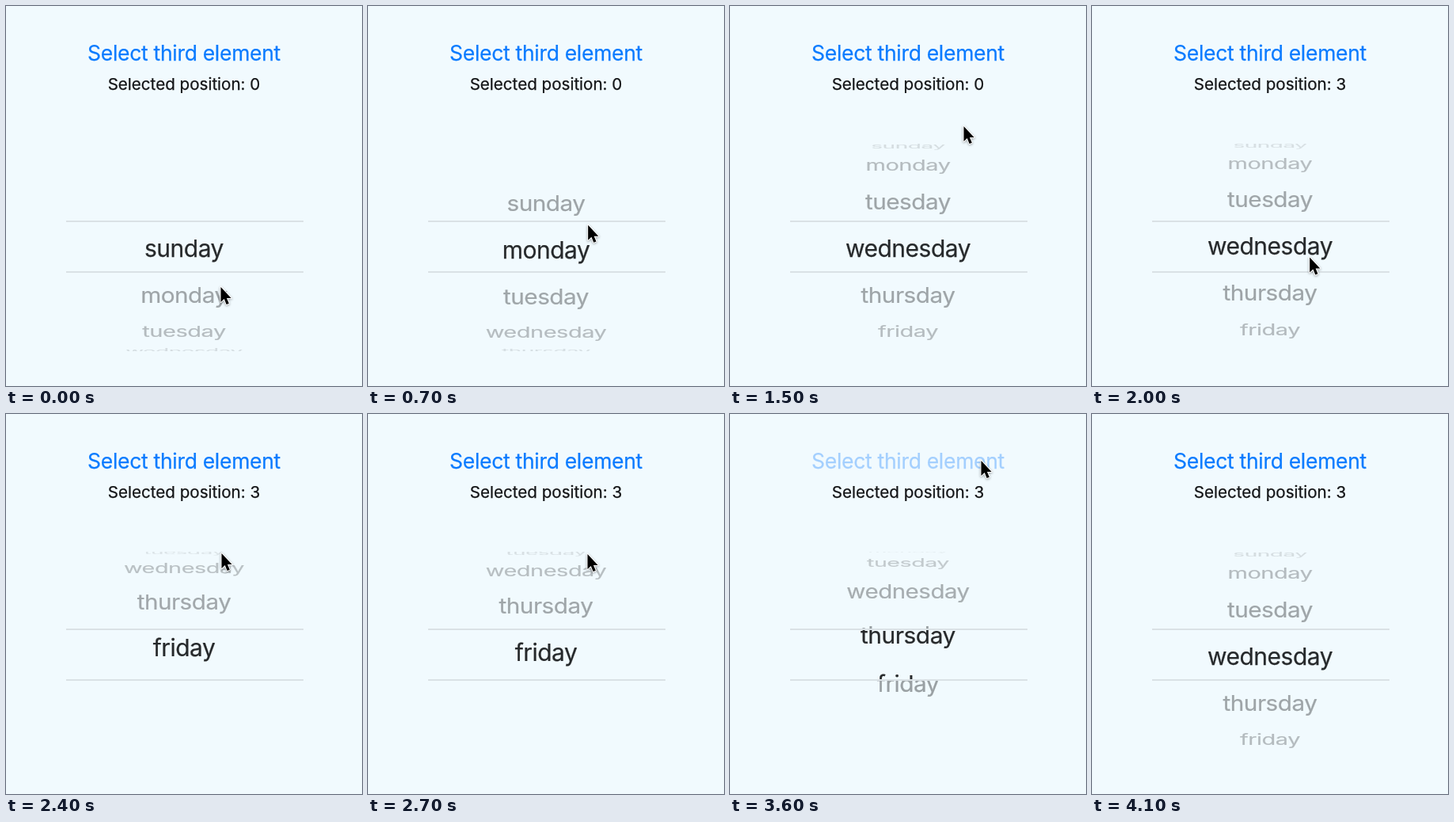
Animation of 450 by 480 pixels, one loop 4600 ms. Source, as an HTML page:

```html
<!DOCTYPE html>
<html lang="en">
<head>
<meta charset="utf-8">
<title>Wheel picker</title>
<style>
html, body { margin: 0; width: 100%; height: 100%; overflow: hidden; }
body {
  position: relative;
  background: #f1fafe;
  font-family: Inter, Roboto, sans-serif;
  font-optical-sizing: none;
}
#stage { position: absolute; left: 0; top: 0; width: 450px; height: 480px; overflow: hidden; }
.text {
  position: absolute; left: 0; width: 450px; height: 40px; line-height: 40px;
  text-align: center; white-space: pre; -webkit-text-stroke: 0.25px currentColor;
}
#title { top: 38.6px; font-size: 26.5px; letter-spacing: -0.3px; color: #0a7bff; }
#label { top: 79.4px; font-size: 20.6px; color: #131416; }
.wheel { position: absolute; inset: 0; }
.wheel .text { top: 285.6px; font-size: 30px; letter-spacing: -0.5px; color: #111315; }
.outer { clip-path: path(evenodd, "M0 174H450V436H0ZM0 272H450V337H0Z"); }
.band { clip-path: inset(272px 0 143px 0); }
.line { position: absolute; left: 76px; width: 300px; height: 2px; background: #dae1e5; }
#cursor { position: absolute; left: 0; top: 0; overflow: visible; filter: drop-shadow(0 1.5px 1.5px rgba(0, 0, 0, .35)); }
</style>
</head>
<body>
<div id="stage">
  <div id="title" class="text">Select third element</div>
  <div id="label" class="text">Selected position: 0</div>
  <div class="wheel outer"></div>
  <div class="wheel band"></div>
  <div class="line" style="top:271px"></div>
  <div class="line" style="top:335px"></div>
  <svg id="cursor" width="20" height="30">
    <path transform="translate(0.5 2) scale(0.86)" d="M0 0V22L5 17.5L8.3 25.5L12 24L8.7 16.2H15.3Z" fill="#000" stroke="#fff" stroke-width="2.4" stroke-linejoin="round" paint-order="stroke"/>
  </svg>
</div>
<script>
const LOOP = 4600, STEP = 100;
const RADIUS = 145.2, ANGLE = 24.2 * Math.PI / 180, DEPTH = 0.1, ROW = 61.5;
const DAYS = ["sunday", "monday", "tuesday", "wednesday", "thursday", "friday"];
const $ = s => document.querySelector(s);
const title = $("#title"), label = $("#label"), cursor = $("#cursor");

// Pointer stops; it eases from each to the next
const STOPS = [
  { t: 300, x: 271, y: 353 },
  { t: 1000, x: 282, y: 224 },
  { t: 1500, x: 295, y: 150 },
  { t: 1900, x: 275, y: 332 },
  { t: 2400, x: 272, y: 174 },
  { t: 2700, x: 277, y: 175 },
  { t: 3200, x: 317, y: 57 }
];

const progress = (t, from, to) => Math.min(1, Math.max(0, (t - from) / (to - from)));
const ease = u => u * u * (3 - 2 * u);

function pointer(t) {
  let { x, y } = STOPS[0];
  for (let i = 1; i < STOPS.length; i++) {
    const a = STOPS[i - 1], b = STOPS[i];
    const u = ease(progress(t, a.t, b.t));
    x += (b.x - a.x) * u;
    y += (b.y - a.y) * u;
  }
  return { x, y };
}

// Rows scrolled: two drags, a spring back, then the jump to the third row
function position(t, y) {
  const last = DAYS.length - 1;
  if (t <= 1500) return Math.max(0, (334 - y) / ROW);
  if (t < 1900) return 3;
  if (t < 2500) {
    const p = Math.max(3, 3 + (319 - y) / ROW);
    return p > last ? last + (p - last) / 2 : p;
  }
  const over = 0.18 * (1 - ease(progress(t, 2480, 2900)));
  return last + over - 2 * ease(progress(t, 3450, 3880));
}

const rows = [];
for (const wheel of document.querySelectorAll(".wheel")) {
  DAYS.forEach((day, index) => {
    const el = document.createElement("div");
    el.className = "text";
    el.textContent = day;
    wheel.append(el);
    rows.push({ el, index, band: wheel.classList.contains("band") });
  });
}

function draw(t) {
  const { x, y } = pointer(t);
  const pos = position(t, y);
  for (const { el, index, band } of rows) {
    const a = (index - pos) * ANGLE, c = Math.cos(a);
    const shown = Math.abs(a) < 1.5;
    el.style.visibility = shown ? "visible" : "hidden";
    if (!shown) continue;
    const s = 1 / (1 + DEPTH * (1 - c));
    el.style.transform = `translateY(${RADIUS * Math.sin(a) * s}px) scale(${s}, ${s * c})`;
    el.style.opacity = band ? 0.9 : 0.4 * c;
  }
  const picked = t < 1700 ? 0 : t < 2900 ? 3 : t < 3500 ? 5 : 3;
  label.textContent = "Selected position: " + picked;
  title.style.opacity = 1 - 0.7 * Math.sin(Math.PI * progress(t, 3300, 3800));
  cursor.style.transform = `translate(${x}px, ${y}px)`;
  cursor.style.visibility = t < 4100 ? "visible" : "hidden";
}

const start = performance.now();
function tick(now) {
  const t = Math.max(0, now - start) % LOOP;
  draw(Math.floor(t / STEP) * STEP);
  requestAnimationFrame(tick);
}
draw(0);
requestAnimationFrame(tick);
</script>
</body>
</html>
```
